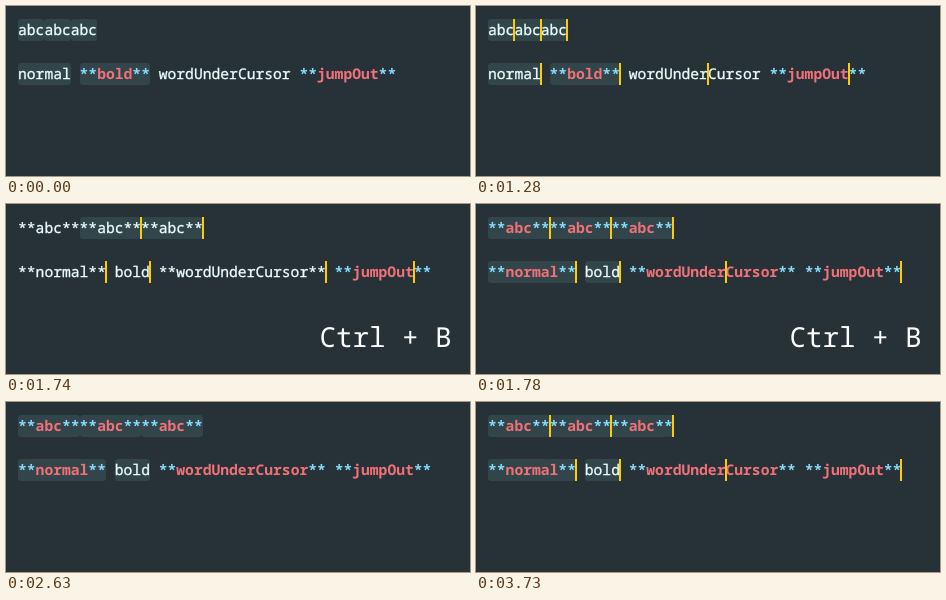
Animation, 464 px wide and 170 px high, one loop 3.96 s. Source, as an HTML page:

```html
<!DOCTYPE html>
<html lang="en">
<head>
<meta charset="utf-8">
<title>Toggle bold</title>
<style>
  html, body { margin: 0; height: 100%; overflow: hidden; background: #263238; }
  svg { display: block; width: 464px; height: 170px; }
  text {
    font: 14.662px "Noto Sans Mono", monospace;
    fill: #eeffff;
    stroke: #eeffff;
    stroke-width: .3px;
    white-space: pre;
    text-rendering: geometricPrecision;
  }
  .mark, .bold { font-weight: 700; stroke: none; }
  .mark { fill: #89ddff; }
  .bold { fill: #f07178; }
  .sel { fill: #31454a; }
  .cursor { fill: #ffcc00; }
  #keys { font-size: 27.5px; fill: #fff; stroke: none; }
</style>
</head>
<body>
<svg viewBox="0 0 464 170">
  <g id="editor"></g>
  <text id="keys" x="313.6" y="143">Ctrl + B</text>
</svg>
<script>
const LOOP = 3960, LEFT = 12, CHAR = 8.797, LINE = 22;
const TOPS = [13, 57];

const bold = word =>
  `<tspan class="mark">**</tspan><tspan class="bold">${word}</tspan><tspan class="mark">**</tspan>`;

// Each line: text, selected column ranges, cursor columns
const before = [
  { text: 'abcabcabc', sel: [[0, 3], [3, 6], [6, 9]], cursors: [3, 6, 9] },
  { text: `normal ${bold('bold')} wordUnderCursor ${bold('jumpOut')}`,
    sel: [[0, 6], [7, 15]], cursors: [6, 15, 25, 41] }
];
const during = [
  { text: '**abc****abc****abc**', sel: [[7, 14], [14, 21]], cursors: [14, 21] },
  { text: `**normal** bold **wordUnderCursor** ${bold('jumpOut')}`,
    sel: [], cursors: [10, 15, 35, 45] }
];
const after = [
  { text: bold('abc').repeat(3), sel: [[0, 7], [7, 14], [14, 21]], cursors: [7, 14, 21] },
  { text: `${bold('normal')} bold ${bold('wordUnderCursor')} ${bold('jumpOut')}`,
    sel: [[0, 10], [11, 15]], cursors: [10, 15, 27, 47] }
];

const colX = col => Math.round(LEFT + col * CHAR);
const rect = (cls, x, y, w, r) =>
  `<rect class="${cls}" x="${x}" y="${y}" width="${w}" height="${LINE}" rx="${r}"/>`;

function drawLine({ text, sel, cursors }, top, blinkOn) {
  const boxes = sel.map(([a, b]) => rect('sel', colX(a), top, colX(b) - colX(a), 3));
  const bars = blinkOn ? cursors.map(c => rect('cursor', colX(c) - 1, top, 2, 0)) : [];
  return boxes.join('') + `<text x="${LEFT}" y="${top + 16}">${text}</text>` + bars.join('');
}

const within = (t, a, b) => t >= a && t < b;
const blinks = [[280, 770], [1280, 2250], [2750, 3230], [3730, LOOP]];
const editor = document.getElementById('editor');
const keys = document.getElementById('keys');
let shown = '';

function render(t) {
  const lines = t < 1740 ? before : t < 1780 ? during : after;
  const blinkOn = blinks.some(([a, b]) => within(t, a, b));
  const html = lines.map((line, i) => drawLine(line, TOPS[i], blinkOn)).join('');
  if (html !== shown) editor.innerHTML = shown = html;
  keys.style.display = within(t, 1690, 2630) ? '' : 'none';
}

let start;
function tick(now) {
  start ??= now;
  render((now - start) % LOOP);
  requestAnimationFrame(tick);
}
render(0);
requestAnimationFrame(tick);
</script>
</body>
</html>
```
